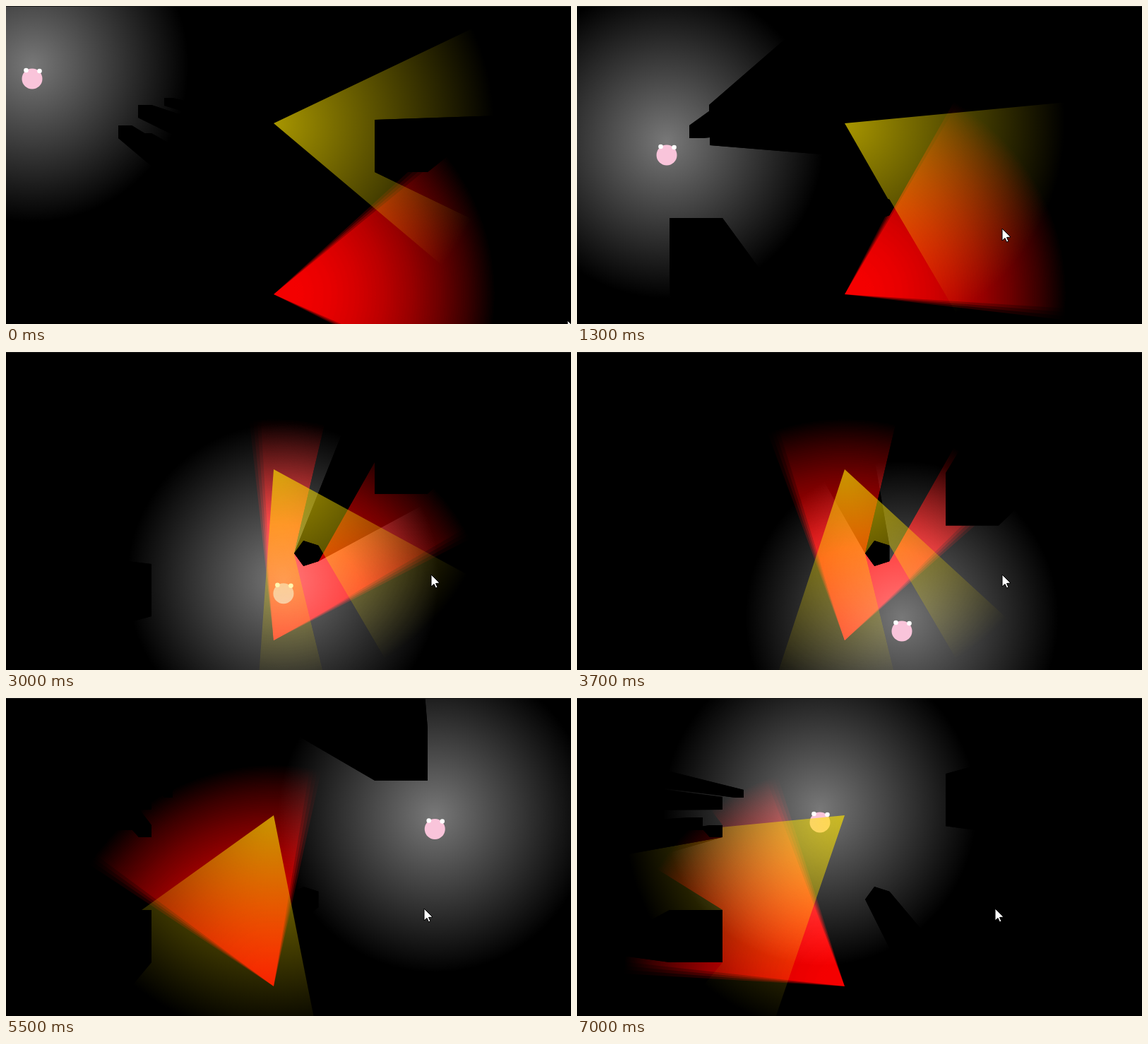
Animation of 800x450 px, one loop 7.1 s. Source, as an HTML page with a canvas:

```html
<!DOCTYPE html>
<html>
<head>
<meta charset="utf-8">
<style>
  html, body { margin: 0; width: 100%; height: 100%; overflow: hidden; background: #000; }
  canvas { display: block; }
</style>
</head>
<body>
<canvas id="stage" width="800" height="450"></canvas>
<script>
const W = 800, H = 450, LOOP = 7100, STEP = 100, RAD = Math.PI / 180, SPEED = 0.1765;
const stage = document.getElementById('stage').getContext('2d');
const layerCanvas = document.createElement('canvas');
layerCanvas.width = W;
layerCanvas.height = H;
const layer = layerCanvas.getContext('2d');

// Signed distance walked at constant speed since a key went down.
const walk = (t, start, distance) =>
  Math.sign(distance) * Math.min(Math.abs(distance), Math.max(0, t - start) * SPEED);

const playerX = t => 37 + walk(t, 790, 250) + walk(t, 2400, 173) + walk(t, 3850, 149) + walk(t, 5490, -265);
const playerY = t => 103 + walk(t, 100, 108) + walk(t, 1550, 69) + walk(t, 2650, 115) + walk(t, 4200, -86) + walk(t, 4800, -133);
const spin = t => 1 + 0.0201 * t + 6.3 * Math.exp(-t / 400);
const boxTop = t => 101.5 + 71 * Math.cos(33 * RAD + 0.0015 * t);
const progress = (t, from, to) => Math.min(1, Math.max(0, (t - from) / (to - from)));

function polygon(cx, cy, r, sides) {
  return Array.from({ length: sides }, (_, i) => {
    const a = Math.PI + i * 2 * Math.PI / sides;
    return [cx + r * Math.cos(a), cy + r * Math.sin(a)];
  });
}
const rect = (x, y, w, h) => [[x, y], [x + w, y], [x + w, y + h], [x, y + h]];
const walls = [
  rect(131, 300, 75, 74), rect(159, 169, 19, 18), rect(188, 180, 18, 17),
  rect(187, 140, 19, 18), rect(224, 130, 12, 11), polygon(427, 285, 19, 5)
];

function fillPoly(ctx, points) {
  ctx.beginPath();
  points.forEach(p => ctx.lineTo(p[0], p[1]));
  ctx.closePath();
  ctx.fill();
}

function disc(x, y, r, color) {
  stage.fillStyle = color;
  stage.beginPath();
  stage.arc(x, y, r, 0, 7);
  stage.fill();
}

// The light is split into equal cones, each a degree narrower, to soften its edges.
function castLight(light, solids, blend) {
  const { x, y, radius, rgb, fade, angle = 0, half = 180, cones = 1 } = light;
  const glow = layer.createRadialGradient(x, y, 0, x, y, radius);
  for (let d = 0; d <= 1; d += 0.125) glow.addColorStop(d, `rgba(${rgb},${fade(d)})`);
  layer.clearRect(0, 0, W, H);
  layer.globalCompositeOperation = 'lighter';
  layer.globalAlpha = 1 / cones;
  layer.fillStyle = glow;
  for (let i = 0; i < cones; i++) {
    layer.beginPath();
    if (half < 180) layer.moveTo(x, y);
    layer.arc(x, y, radius, (angle - half + i) * RAD, (angle + half - i) * RAD);
    layer.fill();
  }
  layer.globalAlpha = 1;
  layer.globalCompositeOperation = 'destination-out';
  layer.fillStyle = '#000';
  const project = p => [x + (p[0] - x) * 60, y + (p[1] - y) * 60];
  for (const solid of solids) {
    fillPoly(layer, solid);
    solid.forEach((p, i) => {
      const q = solid[(i + 1) % solid.length];
      fillPoly(layer, [p, q, project(q), project(p)]);
    });
  }
  stage.globalCompositeOperation = blend;
  stage.drawImage(layerCanvas, 0, 0);
  stage.globalCompositeOperation = 'source-over';
}

function drawCursor(x, y) {
  stage.save();
  stage.translate(x, y);
  stage.fillStyle = '#fff';
  stage.strokeStyle = '#000';
  fillPoly(stage, [[0, 0], [0, 17], [4, 13.5], [6.5, 19], [9, 18], [6.5, 12.5], [12, 12]]);
  stage.stroke();
  stage.restore();
}

function draw(t) {
  const px = playerX(t), py = playerY(t), angle = spin(t);
  const solids = [...walls, rect(522, boxTop(t), 75, 74)];

  stage.fillStyle = '#000';
  stage.fillRect(0, 0, W, H);

  castLight({
    x: px, y: py - 19, radius: 222, rgb: '255,255,255', fade: d => 0.47 * (1 - d)
  }, solids, 'lighter');
  castLight({
    x: 379, y: 408, radius: 314, rgb: '255,0,0', fade: d => 0.97 * (1 - d ** 2),
    angle: -angle - 0.5, half: 34.5, cones: 4
  }, solids, 'lighter');

  disc(px, py, 14.5, '#f9c4da');
  disc(px - 8.5, py - 12, 3.3, '#fff');
  disc(px + 10.5, py - 11, 3.3, '#fff');

  castLight({
    x: 379, y: 166, radius: 312, rgb: '255,228,0', fade: d => 0.66 * (1 - d),
    angle, half: 32.8
  }, solids, 'source-over');

  stage.fillStyle = '#1c1c1c';
  stage.fillRect(0, 0, W, 1);

  const enter = progress(t, 200, 700), nudge = progress(t, 4300, 4600);
  drawCursor(795 - 193 * enter - 10 * nudge, 445 - 130 * enter - 17 * nudge);
}

const start = performance.now();
function tick() {
  const t = (performance.now() - start) % LOOP;
  draw(Math.floor(t / STEP) * STEP);
  requestAnimationFrame(tick);
}
tick();
</script>
</body>
</html>
```
